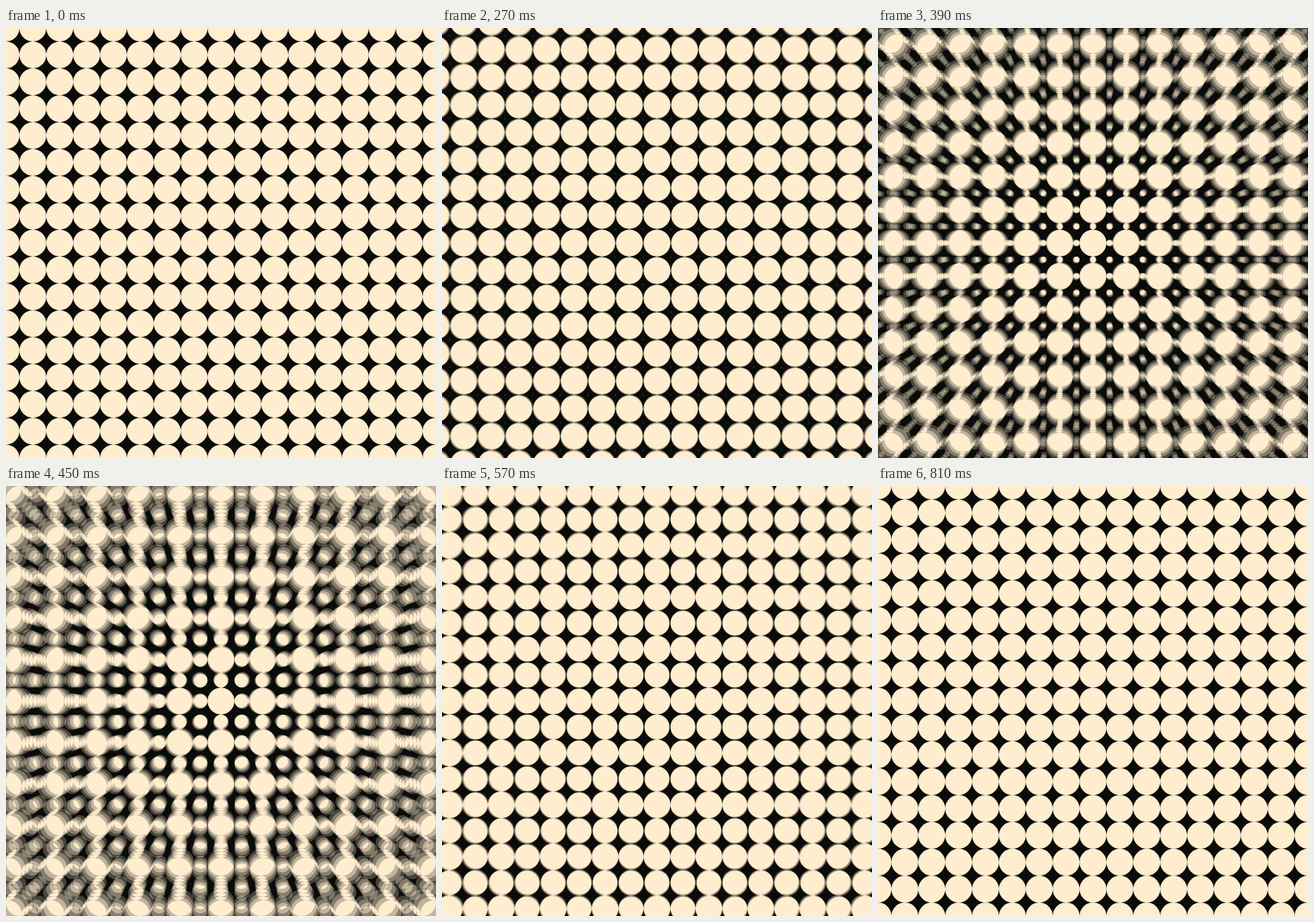
Write an HTML page with a canvas that moves like this. It is 500x500 px and loops after 0.9 s.

```html
<!DOCTYPE html>
<html lang="en">
<head>
<meta charset="utf-8">
<title>Dot grid zoom</title>
<style>
  html, body { margin: 0; width: 100%; height: 100%; overflow: hidden; background: #0a0c0a; }
  canvas { display: block; width: 500px; height: 500px; }
</style>
</head>
<body>
<canvas id="stage" width="500" height="500"></canvas>
<script>
const SIZE = 500, LOOP = 900, FRAMES = 30;
const SAMPLES = 4, SHUTTER = 0.6;      // motion blur
const GAP = 31.25, RADIUS = GAP / 2, REACH = 17;
const INK = '#0a0c0a', CREAM = '#ffedcf';

const out = document.getElementById('stage').getContext('2d');
const layer = document.createElement('canvas');
layer.width = layer.height = SIZE;
const pen = layer.getContext('2d');

const ease = (p, g) => p < 0.5
  ? 0.5 * Math.pow(2 * p, g)
  : 1 - 0.5 * Math.pow(2 * (1 - p), g);

// The grid doubles its spacing while new dots grow in the gaps.
function drawGrid(p) {
  const e = ease(p, 6);
  const step = GAP * (1 + e) / 2;
  pen.fillStyle = INK;
  pen.fillRect(0, 0, SIZE, SIZE);
  pen.fillStyle = CREAM;
  pen.beginPath();
  for (let i = -REACH; i <= REACH; i++) {
    for (let j = -REACH; j <= REACH; j++) {
      const r = i % 2 || j % 2 ? RADIUS * e : RADIUS;
      const x = SIZE / 2 + i * step, y = SIZE / 2 + j * step;
      if (r < 0.01 || Math.max(Math.abs(x - 250), Math.abs(y - 250)) > 250 + r) continue;
      pen.moveTo(x + r, y);
      pen.arc(x, y, r, 0, 2 * Math.PI);
    }
  }
  pen.fill();
}

function render(frame) {
  for (let s = 0; s < SAMPLES; s++) {
    drawGrid((frame + s * SHUTTER / SAMPLES) / FRAMES);
    out.globalAlpha = 1 / (s + 1);
    out.drawImage(layer, 0, 0);
  }
}

const start = performance.now();
let shown = -1;
function tick() {
  const ms = (performance.now() - start) % LOOP;
  const frame = Math.floor(ms / LOOP * FRAMES + 1e-6) % FRAMES;
  if (frame !== shown) render(shown = frame);
  requestAnimationFrame(tick);
}
tick();
</script>
</body>
</html>
```
